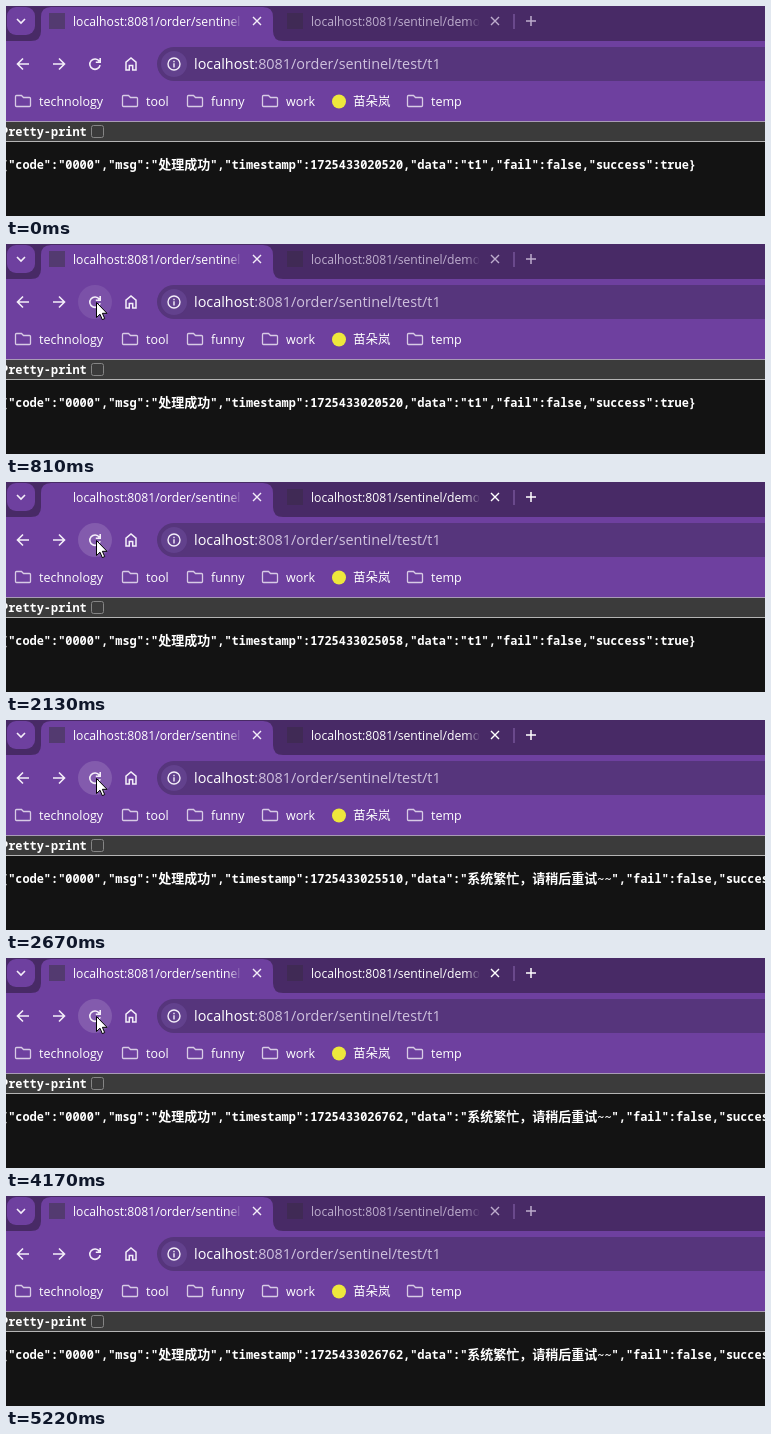
These frames come from a looping animation (759 by 210 pixels, 5310 ms). An HTML page with a canvas:

```html
<!DOCTYPE html>
<html lang="zh-CN">
<head>
<meta charset="utf-8">
<style>
html, body { margin: 0; width: 100%; height: 100%; overflow: hidden; background: #131313; }
canvas { display: block; }
</style>
</head>
<body>
<canvas id="stage" width="759" height="210"></canvas>
<script>
const ctx = document.getElementById('stage').getContext('2d');
const LOOP = 5310;
const COLORS = { strip: '#482a66', bar: '#6e409f', field: '#56357c', fieldHover: '#5b3c81', icon: '#f4eef9', page: '#131313' };
const UI = '"Open Sans", "Noto Sans CJK SC", "Noto Sans CJK", sans-serif';
const TITLE = '500 12.2px ' + UI;
const URL_FONT = '14.4px ' + UI;
const BOOKMARK = '500 12.5px ' + UI;
const MONO = 'bold 11.92px "Noto Sans Mono", monospace';
const CJK = 'bold 13px "Noto Sans CJK SC", "Noto Sans CJK", sans-serif';

// time, millisecond part of the timestamp, request was rejected
const RESPONSES = [
  [0, 20520, false], [1020, 24128, false], [1440, 24430, true], [2070, 25058, false],
  [2520, 25510, true], [3030, 25980, true], [3540, 26531, false], [3810, 26762, true]
];
const LOADING = [[840, 1020], [1200, 1650], [1890, 2280], [2430, 2640], [2970, 3360], [3480, 3565], [3750, 3830]];
// time, x, y of the pointer tip
const POINTER = [
  [60, 689, 107], [150, 499, 95], [270, 299, 73], [390, 185, 61], [480, 160, 59], [570, 147, 59],
  [600, 141, 59], [750, 90, 58], [4340, 90, 58], [4440, 289, 50], [4530, 539, 71], [4620, 701, 96],
  [4830, 743, 127], [5010, 759, 133]
];

const within = (t, a, b) => t >= a && t < b;

function pointerAt(t) {
  const i = POINTER.findIndex(p => p[0] > t);
  if (i < 1) return null;
  const [t0, x0, y0] = POINTER[i - 1], [t1, x1, y1] = POINTER[i];
  const k = (t - t0) / (t1 - t0);
  return [x0 + (x1 - x0) * k, y0 + (y1 - y0) * k];
}

function text(str, x, y, font, color) {
  ctx.font = font;
  ctx.fillStyle = color;
  ctx.fillText(str, x, y);
  return x + ctx.measureText(str).width;
}

function box(x, y, w, h, r, color) {
  ctx.fillStyle = color;
  ctx.beginPath();
  ctx.roundRect(x, y, w, h, r);
  ctx.fill();
}

function disc(x, y, r, color) {
  ctx.fillStyle = color;
  ctx.beginPath();
  ctx.arc(x, y, r, 0, 7);
  ctx.fill();
}

function line(path, x, y, color = COLORS.icon, width = 1.6) {
  ctx.save();
  ctx.translate(x, y);
  ctx.strokeStyle = color;
  ctx.lineWidth = width;
  ctx.stroke(new Path2D(path));
  ctx.restore();
}

function fadingTitle(str, x, end, color) {
  const fade = ctx.createLinearGradient(end - 14, 0, end, 0);
  fade.addColorStop(0, color);
  fade.addColorStop(1, color + '00');
  text(str, x, 20, TITLE, fade);
}

function drawTabs(t) {
  const focused = within(t, 840, 5220);
  const idle = focused ? '#ffffff' : '#bdadcd';
  const cross = 'M-4-4 4 4M4-4-4 4';
  box(0, 0, 759, 35, 0, COLORS.strip);
  box(1, 1, 28, 28, 9, COLORS.bar);
  line('M-4-2 0 2 4-2', 15, 15);
  ctx.fillStyle = COLORS.bar;
  ctx.fill(new Path2D('M25 35Q35 35 35 25V11Q35 1 45 1H257Q267 1 267 11V25Q267 35 277 35Z'));
  if (!LOADING.some(([a, b]) => within(t, a, b))) box(43, 7, 16, 16, 0, '#533a70');
  box(281, 7, 16, 16, 0, '#402a55');
  fadingTitle('localhost:8081/order/sentinel', 67, 236, '#ffffff');
  fadingTitle('localhost:8081/sentinel/demo', 305, 474, idle);
  line(cross, 251, 15, COLORS.icon, 1.4);
  line(cross, 489, 15, idle, 1.4);
  line('M0-7V8', 508, 15, '#76559a', 1.5);
  line('M-5 0H5M0-5V5', 525, 15, idle, 1.5);
}

function drawToolbar(t, pointer) {
  box(0, 35, 759, 80, 0, COLORS.bar);
  const [px, py] = pointer || [-99, -99];
  const hover = x => Math.hypot(px - x, py - 58) < 17;
  if (hover(89)) disc(89, 58, 17, `rgba(255,255,255,${t < 1800 ? 0.09 : 0.14})`);
  if (hover(125)) disc(125, 58, 17, 'rgba(255,255,255,.1)');

  line('M6 0H-5M0-5.5-5.5 0 0 5.5', 17, 58);
  line('M-6 0H5M0-5.5 5.5 0 0 5.5', 53, 58);
  line('M4.3-2.8A5.2 5.2 0 1 0 5.1 1.2M5.2-6V-1.7H.8', 89, 58);
  line('M-5 6V-1.8L0-6 5-1.8V6H1.7V1.5H-1.7V6Z', 125, 58, COLORS.icon, 1.5);

  const inField = px > 141 && within(py, 41, 75);
  box(151, 41, 640, 34, 17, inField ? COLORS.fieldHover : COLORS.field);
  disc(168, 58, 13, hover(168) ? '#6c4a98' : '#62418d');
  line('M6 0A6 6 0 1 1-6 0A6 6 0 1 1 6 0M0-.8V3.4M0-3.3V-1.8', 168, 58, COLORS.icon, 1.4);
  const x = text('localhost', 188, 63, URL_FONT, '#ffffff');
  text(':8081/order/sentinel/test/t1', x, 63, URL_FONT, '#cfc2de');

  const folder = 'M-6.5-5.5H-1.5L.5-3.5H6.5Q7.5-3.5 7.5-2.5V4.5Q7.5 5.5 6.5 5.5H-6.5Q-7.5 5.5-7.5 4.5V-4.5Q-7.5-5.5-6.5-5.5Z';
  const bookmarks = [['technology', 33], ['tool', 140], ['funny', 205], ['work', 280], ['temp', 425]];
  for (const [name, left] of bookmarks) {
    line(folder, left - 16, 95, '#d8cbe5', 1.3);
    text(name, left, 100, BOOKMARK, '#ffffff');
  }
  disc(333, 95.5, 7, '#eee83c');
  text('苗朵岚', 347, 100, BOOKMARK, '#ffffff');
}

function drawPage(t) {
  box(0, 115, 759, 95, 0, COLORS.page);
  box(0, 116, 759, 19, 0, '#3b3b3b');
  box(0, 115, 759, 1, 0, '#a99bb6');
  box(0, 135, 759, 1, 0, '#b4b4b4');
  text('Pretty-print', -5, 130, MONO, '#ffffff');
  line('M-4-6H4Q6-6 6-4V4Q6 6 4 6H-4Q-6 6-6 4V-4Q-6-6-4-6Z', 91.5, 125.5, within(t, 4800, 4980) ? '#b0b0b0' : '#858585', 1);

  const [, ms, rejected] = RESPONSES.filter(r => r[0] <= t).pop();
  const parts = [
    ['{"code":"0000","msg":"', MONO], ['处理成功', CJK],
    [`","timestamp":${1725433000000 + ms},"data":"`, MONO],
    rejected ? ['系统繁忙，请稍后重试', CJK] : ['t1', MONO],
    [(rejected ? '~~' : '') + '","fail":false,"success":true}', MONO]
  ];
  let x = -5;
  for (const [str, font] of parts) x = text(str, x, 163, font, '#ffffff');
}

function drawPointer([x, y]) {
  const arrow = new Path2D('M.5.5V15.5L4 12.2 6.3 17.6 8.7 16.6 6.4 11.3H11Z');
  ctx.save();
  ctx.translate(x, y);
  ctx.fillStyle = '#fff';
  ctx.strokeStyle = '#000';
  ctx.lineWidth = 1;
  ctx.fill(arrow);
  ctx.stroke(arrow);
  ctx.restore();
}

const start = performance.now();

function draw() {
  const t = (performance.now() - start) % LOOP;
  const pointer = pointerAt(t);
  drawToolbar(t, pointer);
  drawTabs(t);
  drawPage(t);
  if (pointer) drawPointer(pointer);
  requestAnimationFrame(draw);
}

draw();
</script>
</body>
</html>
```
